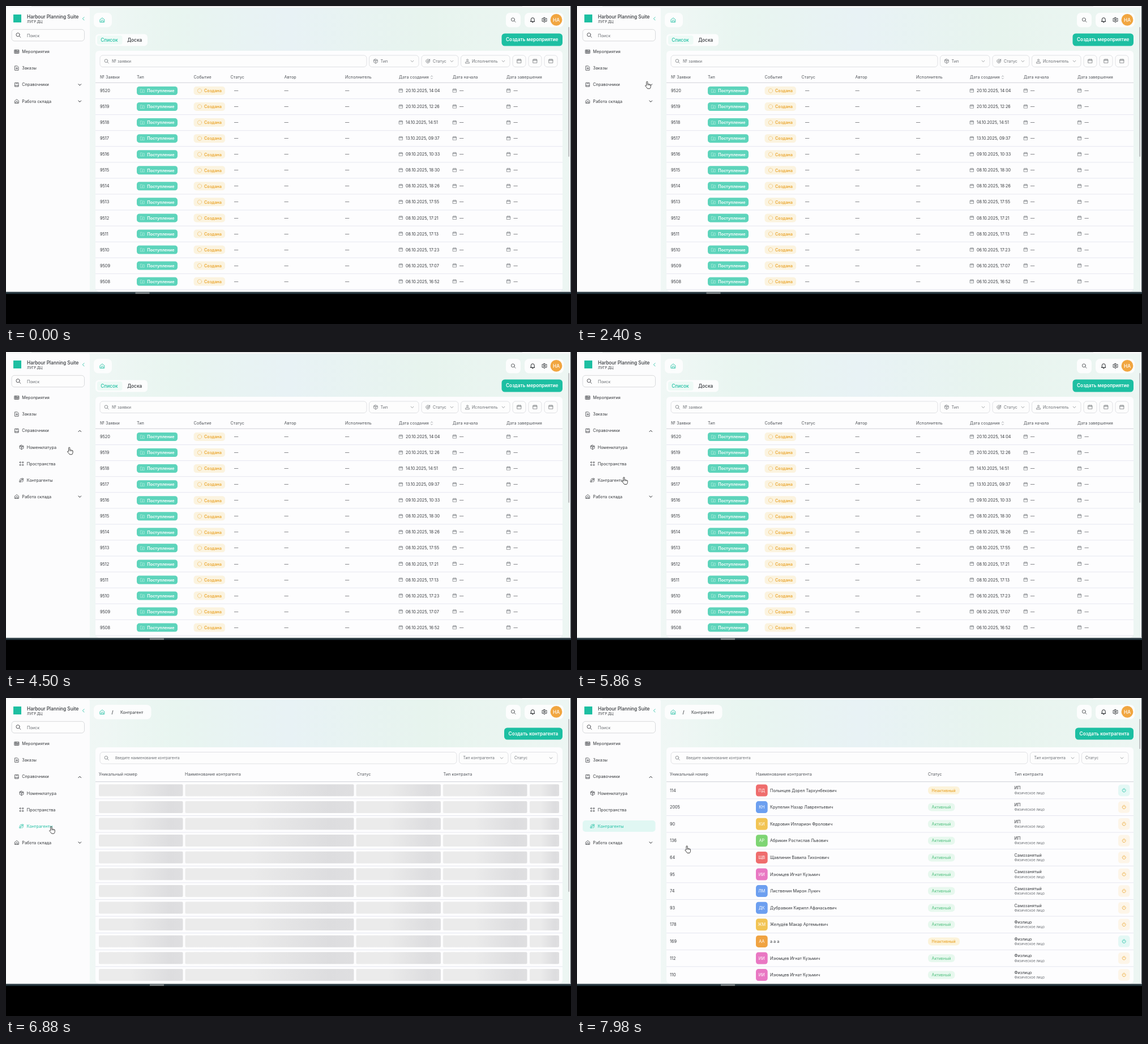
An HTML page that plays this animation: 998 px wide and 561 px high, repeating every 8000 ms.

```html
<!DOCTYPE html>
<html lang="ru">
<head>
<meta charset="utf-8">
<style>
html, body { margin: 0; width: 100%; height: 100%; overflow: hidden; background: #000; }
svg { display: block; width: 998px; height: 561px; font-family: Inter, Roboto, sans-serif; }
</style>
</head>
<body>
<svg id="stage" viewBox="0 0 998 561"></svg>
<script>
const LOOP = 8000, PAGE_SWITCH = 6660, DATA_READY = 7560, SHIMMER = 452;
const TEAL = '#1dbfa2', INK = '#34373b', DARK = '#1f2226', GREY = '#6c7075', LINE = '#d9dadd', AMBER = '#eaa62f';

// Icon paths on a 24-unit grid
const ICONS = {
  search: 'M18 10.5a7.5 7.5 0 1 1-15 0 7.5 7.5 0 0 1 15 0M16 16l6 6',
  home: 'M3 10l9-7 9 7v11H3zM8 21v-7q4-4 8 0v7',
  list: 'M2 4h20v16H2zM2 9h20M2 14h20M8 4v16M15 9v11',
  order: 'M4 2h11l5 5v15H4zM12 9v8M8 13h8',
  book: 'M4 3h16v18H4zM4 16h16M9 7h6',
  box: 'M12 2l9 5v10l-9 5-9-5V7zM3 7l9 5 9-5M12 12v10M7 4.5l9 5',
  grid: 'M3 6a3 3 0 1 0 6 0 3 3 0 0 0-6 0M15 6a3 3 0 1 0 6 0 3 3 0 0 0-6 0M3 18a3 3 0 1 0 6 0 3 3 0 0 0-6 0M15 18a3 3 0 1 0 6 0 3 3 0 0 0-6 0',
  people: 'M14 4h6v6h-6zM3 15h6v6H3zM5 12V8l5-4M19 13v4l-5 4M9 15l6-6',
  calendar: 'M3 5h18v16H3zM3 10h18M8 2v5M16 2v5',
  target: 'M20 10a9 9 0 1 1-7-7M16 12a4 4 0 1 1-4-4M12 12l9-9M17 3v4h4',
  user: 'M16 7a4 4 0 1 1-8 0 4 4 0 0 1 8 0M3 21v-3q0-3 4-3h10q4 0 4 3v3z',
  bell: 'M5 17V10a7 7 0 0 1 14 0v7l2 2H3zM10 22h4',
  gear: 'M15.5 12a3.5 3.5 0 1 1-7 0 3.5 3.5 0 0 1 7 0M10 2h4l1 3 3 1 3-1 2 4-3 3 3 3-2 4-3-1-3 1-1 3h-4l-1-3-3-1-3 1-2-4 3-3-3-3 2-4 3 1 3-1z',
  folder: 'M2 4h7l3 3h10v14H2zM12 10v7M9 14l3 3 3-3',
  power: 'M12 2v9M7 5a9 9 0 1 0 10 0',
  down: 'M5 9l7 7 7-7',
  up: 'M5 16l7-7 7 7',
  left: 'M15 4l-8 8 8 8'
};

const text = (x, cy, str, { size = 7.28, fill = INK, weight = 400, anchor = 'start' } = {}) =>
  `<text x="${x}" y="${cy + size * .36}" font-size="${size}" fill="${fill}" font-weight="${weight}" text-anchor="${anchor}">${str}</text>`;
const rect = (x, y, w, h, fill, r = 0, stroke = 'none') =>
  `<rect x="${x}" y="${y}" width="${w}" height="${h}" rx="${r}" fill="${fill}" stroke="${stroke}" stroke-width=".8"/>`;
const icon = (name, cx, cy, size = 9, color = INK, width = 2) =>
  `<path d="${ICONS[name]}" transform="translate(${cx - size / 2} ${cy - size / 2}) scale(${size / 24})" fill="none" stroke="${color}" stroke-width="${width}" stroke-linejoin="round" stroke-linecap="round"/>`;
const rule = (y, color = '#e3e4ee') => rect(158, y, 825, .9, color);
const group = (id, body, extra = '') => `<g id="${id}" ${extra}>${body}</g>`;
const repeat = (n, fn) => Array.from({ length: n }, (_, i) => fn(i)).join('');
const field = (x, y, w, label, labelX, size, name) =>
  rect(x, y, w, 20.5, '#fdfdfd', 5, LINE) + text(labelX, y + 10.5, label, { size, fill: GREY }) +
  (name ? icon(name, x + 11.5, y + 10.3, 9, GREY) : '');
const select = (x, y, w, label, labelX, size, name) =>
  field(x, y, w, label, labelX, size, name) + icon('down', x + w - 11.5, y + 10.3, 8, GREY);
const button = (x, y, w, h, label) =>
  rect(x, y, w, h, TEAL, 5.5) + text(x + w / 2, y + h / 2, label, { size: 8.3, fill: '#fff', weight: 600, anchor: 'middle' });
const menuItem = (x, y, name, label, color = INK) =>
  icon(name, x, y, 9, color) + text(x + 9.3, y, label, { fill: color });

function chrome() {
  return rect(0, 0, 998, 505, '#f7f8f8') + rect(45, 0, 867, .8, '#d5d6d8') +
    rect(1, 3, 994, 500.5, 'url(#backdrop)', 3) +
    rect(1, 3, 147, 500.5, '#fcfcfd', 3) +
    rect(997, 0, 1, 505, '#3d4a50') +
    rect(0, 503.5, 998, 1, '#d3d7d9') + rect(0, 504.5, 998, 3.5, '#22323a') +
    '<rect id="task" y="505" width="25" height="3" fill="#6d7679"/>';
}

function sidebar() {
  return rect(13, 15, 14, 14, TEAL) +
    text(37, 19, 'Harbour Planning Suite', { size: 8.3, weight: 500 }) +
    text(37, 28, 'ЛУГР.ДЦ', { size: 6.24 }) + icon('left', 137, 22.3, 8, TEAL, 2.5) +
    rect(10, 41.3, 128.5, 20.5, '#fdfdfd', 5, '#cfd1d4') + icon('search', 21.7, 51.3, 10) +
    text(37, 52, 'Поиск', { fill: GREY }) +
    menuItem(19, 80.5, 'list', 'Мероприятия') +
    menuItem(19, 109.6, 'order', 'Заказы') +
    menuItem(19, 138.8, 'book', 'Справочники') +
    group('closedMark', icon('down', 130.3, 138.8, 8, DARK, 3)) +
    group('openMark', icon('up', 130.3, 139.3, 8, DARK, 3)) +
    group('submenu',
      menuItem(27.5, 168, 'box', 'Номенклатура') +
      menuItem(27.5, 197, 'grid', 'Пространства') +
      '<rect id="highlight" x="10" y="216" width="128.5" height="20" rx="5" fill="#e0f7f3"/>' +
      group('idleItem', menuItem(27.5, 226, 'people', 'Контрагенты')) +
      group('activeItem', menuItem(27.5, 226, 'people', 'Контрагенты', TEAL)), 'clip-path="url(#menuClip)"') +
    group('warehouse', menuItem(19, 168, 'home', 'Работа склада') + icon('down', 130.3, 168, 8, DARK, 3));
}

function topBar() {
  return rect(883, 12, 26, 25.5, '#fcfdfd', 7) + icon('search', 896, 24.5, 9.5) +
    rect(916, 12, 69, 25.5, '#fcfdfd', 8) + icon('bell', 930.3, 24.5, 10, DARK, 2.4) +
    icon('gear', 951, 24.5, 9.5, DARK, 2.4) + '<circle cx="972" cy="24.4" r="10.4" fill="#f1a640"/>' +
    text(972, 24.6, 'НА', { size: 8.3, fill: '#fff', weight: 500, anchor: 'middle' });
}

function eventsPage() {
  const dates = ['20.10.2025, 14:04', '20.10.2025, 12:26', '14.10.2025, 14:51', '13.10.2025, 09:37', '09.10.2025, 10:33',
    '08.10.2025, 18:30', '08.10.2025, 18:26', '08.10.2025, 17:55', '08.10.2025, 17:21', '08.10.2025, 17:13',
    '06.10.2025, 17:23', '06.10.2025, 17:07', '06.10.2025, 16:52'];
  const heads = [[166, '№ Заявки'], [231, 'Тип'], [331.5, 'Событие'], [396.5, 'Статус'], [491.5, 'Автор'],
    [599, 'Исполнитель'], [694, 'Дата создания'], [789, 'Дата начала'], [884, 'Дата завершения']];
  const row = (date, i) => {
    const y = 149.5 + i * 28.05;
    return text(166, y, 9520 - i) + rect(231, y - 7.5, 72, 15, '#5dd4bb', 4.5) +
      icon('folder', 241, y, 8, '#b9f0e3') + text(249.3, y + .2, 'Поступление', { fill: '#fff', weight: 600 }) +
      rect(331.5, y - 7.5, 55.5, 15, '#fbf3df', 5) +
      `<circle cx="342" cy="${y}" r="3.6" fill="none" stroke="#f0bd62" stroke-dasharray="1.5 .8"/>` +
      text(350, y + .2, 'Создана', { fill: AMBER, weight: 600 }) +
      [403, 491.5, 599, 801, 896.5].map(x => text(x, y, '—')).join('') +
      [697.5, 792.5, 887.7].map(x => icon('calendar', x, y - .4, 8, GREY)).join('') +
      text(706, y, date) + (i < 12 ? rule(y + 13.7) : '');
  };
  return rect(155, 12, 32, 25.5, '#fcfdfd', 8) + icon('home', 170, 24.7, 10, TEAL) +
    rect(158, 49.5, 92, 21, '#fcfdfd', 6) + rect(161, 52, 44.5, 16, '#eefaf6', 4) +
    text(182.5, 60.3, 'Список', { size: 8.3, fill: TEAL, weight: 500, anchor: 'middle' }) +
    text(227.2, 60.3, 'Доска', { size: 8.3, weight: 500, anchor: 'middle' }) +
    button(875.5, 48.5, 107.5, 22, 'Создать мероприятие') +
    rect(158, 79, 825, 424.5, '#fdfdfe', 6) +
    field(166, 87, 471, '№ заявки', 187, 7.28, 'search') +
    select(641.5, 87, 87.5, 'Тип', 661.5, 7.28, 'box') +
    select(734, 87, 65, 'Статус', 754, 7.1, 'target') +
    select(803.5, 87, 86.5, 'Исполнитель', 823, 7.1, 'user') +
    [895, 923, 951].map(x => rect(x, 87, 23, 20.5, '#fdfdfd', 5, LINE) + icon('calendar', x + 11.5, 97, 9, GREY)).join('') +
    heads.map(([x, label]) => text(x, 125.5, label, { fill: '#505459' })).join('') +
    icon('up', 752, 123.6, 5, GREY, 3) + icon('down', 752, 127.7, 5, GREY, 3) +
    rule(134.8, '#cccdd6') + dates.map(row).join('') + rule(499.8);
}

function partnersPage() {
  const heads = [[164, 'Уникальный номер'], [316, 'Наименование контрагента'], [620, 'Статус'], [772.5, 'Тип контракта']];
  return rect(155, 12, 101.5, 25.5, '#fcfdfd', 8) + icon('home', 170, 24.7, 10, TEAL) +
    text(186.5, 24.7, '/', { size: 8.3, weight: 500 }) + text(202, 25, 'Контрагент') +
    button(880, 52.5, 103, 21, 'Создать контрагента') +
    rect(158, 87, 825, 416.5, '#fdfdfe', 6) +
    field(166, 95.5, 630, 'Введите наименование контрагента', 193, 6.4, 'search') +
    select(800.5, 95.5, 86.5, 'Тип контрагента', 807.5, 6.9) +
    select(891.5, 95.5, 82.5, 'Статус', 898, 6.9) +
    heads.map(([x, label]) => text(x, 134, label, { fill: '#505459' })).join('') + rule(147.3, '#c9cad3') +
    repeat(11, i => rule(177.4 + i * 29.6));
}

function skeleton() {
  const cells = [[164, 148.5], [316.5, 298], [618.5, 149.5], [772, 148.5], [925, 52]];
  return repeat(12, i => cells.map(([x, w]) => rect(x, 152.3 + i * 29.6, w, 21, 'url(#shimmer)', 2)).join(''));
}

function partnerRows() {
  const RED = '#ef6d6d', BLUE = '#6c9ff0', YELLOW = '#f2c453', PINK = '#e978c3';
  const rows = [
    [114, 'Полынцев Дорел Тархунбекович', RED, 'ИП'],
    [2005, 'Крупелин Назар Лаврентьевич', BLUE, 'ИП'],
    [90, 'Кедровин Илларион Фролович', YELLOW, 'ИП'],
    [136, 'Абрикин Ростислав Львович', '#7ed573', 'ИП'],
    [64, 'Щавлинин Вавила Тихонович', RED, 'Самозанятый'],
    [95, 'Изюмцев Игнат Кузьмич', PINK, 'Самозанятый'],
    [74, 'Лиственин Мирон Лукич', BLUE, 'Самозанятый'],
    [93, 'Дубравкин Кирилл Афанасьевич', BLUE, 'Самозанятый'],
    [178, 'Желудёв Макар Артемьевич', YELLOW, 'Физлицо'],
    [169, 'а а а', '#f0a341', 'Физлицо'],
    [112, 'Изюмцев Игнат Кузьмич', PINK, 'Физлицо'],
    [110, 'Изюмцев Игнат Кузьмич', PINK, 'Физлицо']
  ];
  return rows.map(([id, name, color, kind], i) => {
    const y = 163 + i * 29.6, idle = i === 0 || i === 9;
    const initials = name.split(' ').slice(0, 2).map(word => word[0].toUpperCase()).join('');
    return text(164, y, id) + rect(316, y - 10.5, 20.7, 21, color, 4.5) +
      text(326.3, y, initials, { fill: '#fff', anchor: 'middle' }) + text(341, y, name) +
      rect(620, y - 7, idle ? 56 : 47.5, 14, idle ? '#fcf3da' : '#e7f8ee', 6) +
      text(626.5, y, idle ? 'Неактивный' : 'Активный', { size: 6.95, fill: idle ? AMBER : '#63c78c', weight: 500 }) +
      text(772.5, y - 4.3, kind) + text(772.5, y + 4.3, 'Физическое лицо', { size: 6.24, fill: GREY }) +
      rect(956, y - 10.3, 20.5, 20.5, idle ? '#e4f8f5' : '#fdf5e8', 5) +
      icon('power', 966.2, y - .3, 8, idle ? TEAL : AMBER, 2.4);
  }).join('');
}

stage.innerHTML = `<defs>
  <linearGradient id="backdrop">
    <stop offset=".15" stop-color="#f0f7f5"/><stop offset=".3" stop-color="#e8f5f0"/><stop offset=".5" stop-color="#e8f2f5"/>
    <stop offset=".75" stop-color="#e7f4ee"/><stop offset="1" stop-color="#edf6f3"/>
  </linearGradient>
  <linearGradient id="shimmer" x1="-.48" x2="1.04">
    <stop stop-color="#ebebeb"/><stop offset=".316" stop-color="#dddddf"/><stop offset="1" stop-color="#ebebeb"/>
  </linearGradient>
  <clipPath id="menuClip"><rect id="menuArea" x="0" y="154" width="148"/></clipPath>
</defs>` + chrome() + sidebar() + group('events', eventsPage()) +
  group('partners', partnersPage() + group('loading', skeleton()) + group('loaded', partnerRows())) + topBar() +
  '<rect id="scrollbar" x="993.3" y="37" width="2" height="229" rx="1" fill="#b9bbbd"/>' +
  group('cursor', '<path d="M-1 7V1a1.1 1.1 0 0 1 2.2 0V4.6q1-.6 1.8.3 1-.6 1.8.4 1.7-.3 1.7 1.3V8.500q0 2.2-1.5 4H.8Q-.8 10-3.2 7.6q.4-1.4 2.2-.6z" fill="#fff" stroke="#222" stroke-width=".85" stroke-linejoin="round"/><path d="M1.2 4.6V7M3 5v2M4.8 5.4V7" stroke="#222" stroke-width=".6"/>');

const $ = id => document.getElementById(id);
const show = (id, on) => $(id).style.display = on ? '' : 'none';
const clamp = v => Math.min(1, Math.max(0, v));
const smooth = v => v * v * (3 - 2 * v);
const ramp = (t, from, to) => smooth(clamp((t - from) / (to - from)));

// Pointer fingertip: time, x, y
const PATH = [[900, 300, -16], [1600, 150, 127], [2050, 123.7, 133.3], [4200, 123.7, 133.3], [4500, 111.6, 168.3],
  [4960, 104, 187], [5740, 82.8, 221], [6450, 82.8, 221], [6750, 79.8, 226.7], [6880, 79.8, 226.7],
  [7240, 88, 219.7], [7500, 88, 219.7], [7960, 194, 261]];

function pointer(t) {
  const next = PATH.findIndex(p => p[0] > t);
  if (next < 0) return PATH.at(-1).slice(1);
  const [t0, x0, y0] = PATH[Math.max(0, next - 1)], [t1, x1, y1] = PATH[next];
  const k = ramp(t, t0, t1);
  return [x0 + (x1 - x0) * k, y0 + (y1 - y0) * k];
}

// Numeric solution of cubic-bezier(.25, .1, .25, 1)
function ease(x) {
  const bezier = (u, a, b) => 3 * u * (1 - u) ** 2 * a + 3 * u * u * (1 - u) * b + u ** 3;
  let lo = 0, hi = 1;
  for (let i = 0; i < 20; i++) {
    const mid = (lo + hi) / 2;
    if (bezier(mid, .25, .25) < x) lo = mid; else hi = mid;
  }
  return bezier(lo, .1, 1);
}

function draw(now) {
  const t = now % LOOP, switched = t >= PAGE_SWITCH, ready = t >= DATA_READY;
  const open = ramp(t, 2700, 2840);
  $('menuArea').setAttribute('height', 87 * open);
  $('warehouse').setAttribute('transform', `translate(0 ${87 * open})`);
  show('submenu', open > 0);
  show('closedMark', open < .5);
  show('openMark', open >= .5);
  $('highlight').style.opacity = ramp(t, 6890, 7040);
  show('idleItem', !switched);
  show('activeItem', switched);
  show('events', !switched);
  show('partners', switched);
  show('loading', !ready);
  show('loaded', ready);
  $('scrollbar').setAttribute('height', ready ? 53 : switched ? 305 : 229);
  $('task').setAttribute('x', t < 3340 ? 228.5 : 254);

  const phase = ((t - PAGE_SWITCH) / SHIMMER % 1 + 1) % 1;
  $('shimmer').setAttribute('gradientTransform', `translate(${-1.52 + 3 * ease(phase)} 0)`);

  show('cursor', t >= 900);
  $('cursor').setAttribute('transform', `translate(${pointer(t).join(' ')})`);
  requestAnimationFrame(() => draw(performance.now()));
}
draw(performance.now());
</script>
</body>
</html>
```
